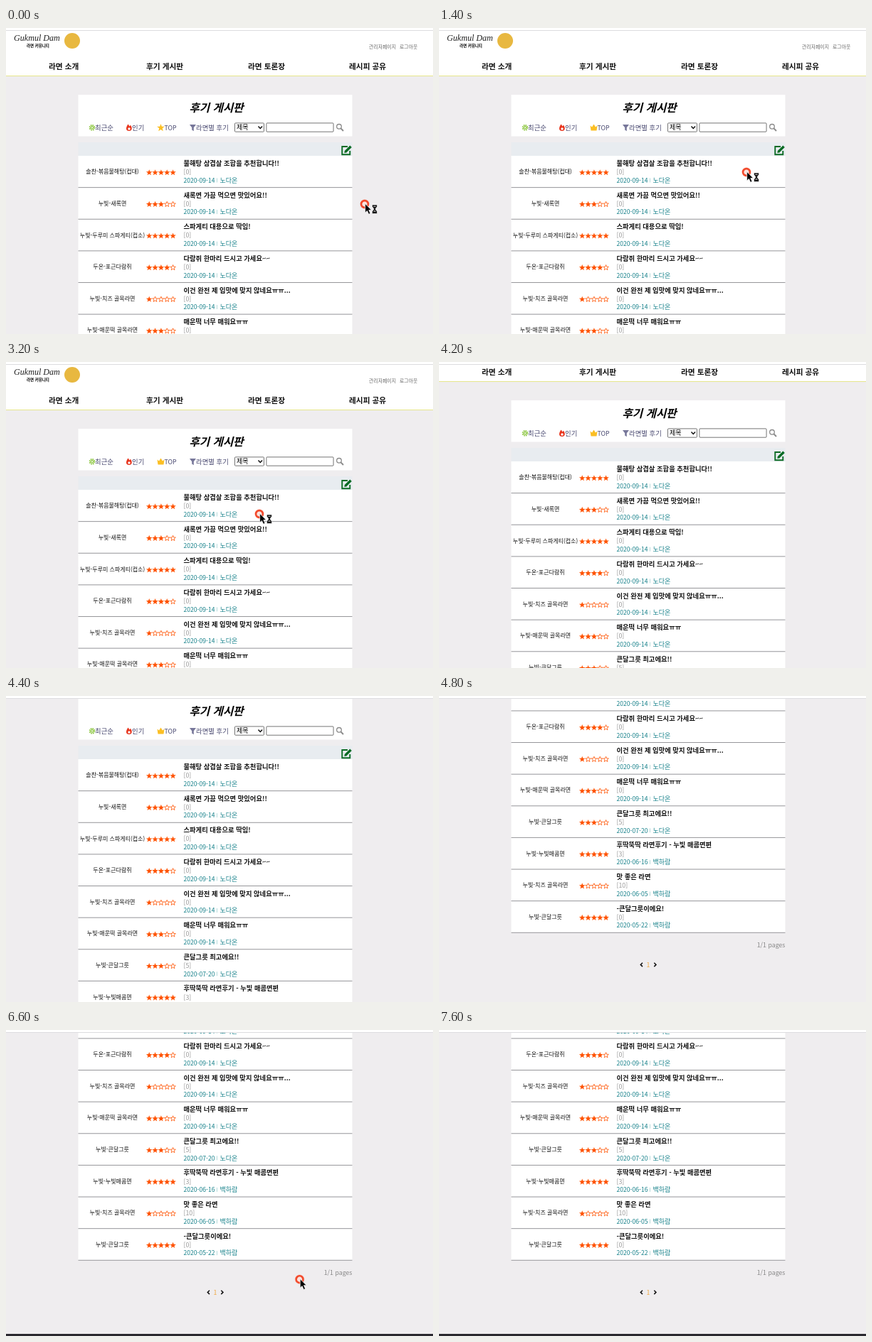
An HTML page that plays this animation: 600 px wide and 431 px high, repeating every 8 s.

```html
<!DOCTYPE html>
<html lang="ko">
<head>
<meta charset="utf-8">
<title>후기 게시판</title>
<style>
  html, body { margin: 0; width: 100%; height: 100%; overflow: hidden; background: #efedef; }
  svg { display: block; width: 600px; height: 431px; }
  text { font-family: "Noto Sans CJK KR", "Noto Sans", sans-serif; white-space: pre; }
  .b { font-weight: 700; }
  .nav { font-size: 10.7px; font-weight: 700; fill: #111; }
  .menu { font-size: 9.4px; fill: #47476f; }
  .subject { font-size: 9.3px; font-weight: 700; fill: #111; }
  .count { font-size: 8.8px; fill: #999; }
  .date { font-size: 8.6px; fill: #16808a; }
  .who { font-size: 9px; fill: #16808a; }
  .item { font-size: 8px; font-weight: 500; fill: #111; text-anchor: middle; }
  .user { font-size: 6.9px; fill: #666; }
</style>
</head>
<body>
<svg viewBox="0 0 600 431">
  <g id="page">
    <rect y="-10" width="600" height="77" fill="#fff"/>
    <rect y="67" width="600" height="1" fill="#e6e68c"/>
    <text x="11" y="18" style="font: italic 12.1px 'Liberation Serif', serif" fill="#222">Gukmul Dam</text>
    <text x="29" y="27.3" class="b" font-size="5.5">라면 커뮤니티</text>
    <circle cx="93" cy="18" r="11" fill="#e8b840"/>
    <text x="510" y="28.6" class="user">관리자페이지</text>
    <text x="553" y="28.6" class="user">로그아웃</text>
    <text x="60" y="58" class="nav">라면 소개</text>
    <text x="197" y="58" class="nav">후기 게시판</text>
    <text x="340" y="58" class="nav">라면 토론장</text>
    <text x="482" y="58" class="nav">레시피 공유</text>

    <rect x="101.5" y="94" width="385" height="58.5" fill="#fff"/>
    <text x="257.5" y="117.5" font-size="15.6" font-weight="900" font-style="italic">후기 게시판</text>
    <g fill="none" stroke="#8cc63f">
      <circle cx="121" cy="140.3" r="3.4" stroke-width="1.8" stroke-dasharray="1.7 .97"/>
      <circle cx="121" cy="140.3" r="1.7" stroke-width="1.2"/>
    </g>
    <path d="M171.500 135.500C173 137 173 138 173.500 138.500C174.500 138 174.500 137 174.500 136.500C177.500 139 178 145 173 145C168 145 168 140 171.500 135.500Z" fill="#e8341c"/>
    <circle cx="173" cy="142" r="1.7" fill="#fff"/>
    <path id="star" fill="#fbbf24"/>
    <path id="crown" d="M212.500 137.500L215 139.500L217.500 135.500L220 139.500L222.500 137.500L221.500 144.500H213.500Z" fill="#fbbf24"/>
    <path d="M258 136H267L263.800 140.300V145.300L261.200 143.500V140.300Z" fill="#77779a"/>
    <text x="125" y="143.700" class="menu">최근순</text>
    <text x="177" y="143.700" class="menu">인기</text>
    <text x="222.500" y="143.700" class="menu" style="font-size:8.800px">TOP</text>
    <text x="267" y="143.700" class="menu">라면별 후기</text>
    <g fill="#fff" stroke="#666" stroke-width=".9">
      <rect x="321.500" y="133.900" width="41" height="12.300" rx="1"/>
      <rect x="365.900" y="133.900" width="94.200" height="12.300" rx="1"/>
    </g>
    <text x="324" y="143.300" font-size="9">제목</text>
    <path d="M354.500 138.500L357.300 141.500L360.100 138.500" fill="none" stroke="#111" stroke-width="1.500"/>
    <g fill="none" stroke="#8a8a8a">
      <circle cx="468" cy="138.800" r="3.300" stroke-width="1.300"/>
      <path d="M470.500 141.300L474 145" stroke-width="1.900"/>
    </g>

    <rect x="101.500" y="161" width="385" height="19" fill="#e8ecf0"/>
    <g fill="none" stroke="#0b6b24">
      <path d="M480 167H472.300V178.300H483.300V173" stroke-width="1.900"/>
      <path d="M476.800 174.500L484.600 166.700" stroke-width="3.400"/>
    </g>
    <path d="M475.300 176L476 172.800L478.500 175.300Z" fill="#0b6b24"/>
    <g id="rows"></g>

    <text x="486.500" y="646.500" font-size="8.800" fill="#888" text-anchor="end">1/1 pages</text>
    <g fill="none" stroke="#111" stroke-width="1.500">
      <path d="M286 668.700L283.300 671.400L286 674.100"/>
      <path d="M302.300 668.700L305 671.400L302.300 674.100"/>
    </g>
    <text x="294" y="674.700" font-size="8.800" fill="#f0a840" text-anchor="middle">1</text>
    <rect y="730" width="600" height="40" fill="#2a292f"/>
  </g>

  <rect width="600" height="3" fill="#fff"/>
  <rect y="3" width="600" height="1" fill="#dcdcdf"/>

  <g id="cursor">
    <circle r="6.700" fill="#ff8a70" opacity=".35"/>
    <circle r="4.900" fill="#fbe3de" stroke="#f24a2c" stroke-width="2.600"/>
    <path d="M.7 -.5V12L3.500 9.400L5.700 14.300L8 13.300L5.800 8.500H9.600Z" fill="#000" stroke="#fff" stroke-width=".7"/>
    <g id="busy">
      <path d="M10.500 1H17.500V3.500L15 7L17.500 10.500V13.500H10.500V10.500L13 7L10.500 3.500Z" fill="#111" stroke="#fff" stroke-width=".6"/>
      <path d="M12.300 3.300H15.700M12.600 11.200L14 9.300L15.400 11.200" fill="none" stroke="#fff" stroke-width=".8"/>
    </g>
  </g>
</svg>
<script>
const $ = id => document.getElementById(id);
const LOOP = 8000, STEP = 200, TOP = 180, ROW = 44.63;

// item, stars, subject, comments, date, writer
const A = "노다온", B = "백하람", SEP = "2020-09-14";
const posts = [
  ["솔찬-볶음불해탕(컵대)", 5, "불해탕 삼겹살 조합을 추천합니다!!", 0, SEP, A],
  ["누빛-새록면", 3, "새록면 가끔 먹으면 맛있어요!!", 0, SEP, A],
  ["누빛-두루미 스파게티(컵소)", 5, "스파게티 대용으로 딱임!", 0, SEP, A],
  ["두온-포근다람쥐", 4, "다람쥐 한마리 드시고 가세요~~", 0, SEP, A],
  ["누빛-치즈 골목라면", 1, "이건 완전 제 입맛에 맞지 않네요ㅠㅠ...", 0, SEP, A],
  ["누빛-매운떡 골목라면", 3, "매운떡 너무 매워요ㅠㅠ", 0, SEP, A],
  ["누빛-큰달그릇", 3, "큰달그릇 최고에요!!", 5, "2020-07-20", A],
  ["누빛-누빛매콤면", 5, "후딱뚝딱 라면후기 - 누빛 매콤면편", 3, "2020-06-16", B],
  ["누빛-치즈 골목라면", 1, "맛 좋은 라면", 10, "2020-06-05", B],
  ["누빛-큰달그릇", 5, "-큰달그릇이에요!", 0, "2020-05-22", B]
];

function starPath(cx, cy, r) {
  let d = "";
  for (let i = 0; i < 10; i++) {
    const a = i * Math.PI / 5, q = i % 2 ? r * 0.42 : r;
    d += (i ? "L" : "M") + (cx + q * Math.sin(a)).toFixed(2) + " " + (cy - q * Math.cos(a)).toFixed(2);
  }
  return d + "Z";
}

const label = (x, y, cls, s) => `<text x="${x}" y="${y}" class="${cls}">${s}</text>`;

function row([item, score, subject, count, date, who], i) {
  const y = TOP + i * ROW;
  let s = `<rect x="101.5" y="${y}" width="385" height="${ROW}" fill="#fff"/>`;
  s += `<rect x="101.5" y="${y + ROW - 0.5}" width="385" height="1" fill="#96969a"/>`;
  s += label(149.5, y + 25.3, "item", item);
  for (let k = 0; k < 5; k++) {
    const on = k < score;
    s += `<path d="${starPath(201.2 + k * 8.35, y + 23.7, on ? 4.5 : 4)}" fill="${on ? "#ff5200" : "none"}" stroke="#ff5200" stroke-width="${on ? 0 : 0.8}"/>`;
  }
  s += label(249.5, y + 14, "subject", subject);
  s += label(249.5, y + 26.2, "count", `[${count}]`);
  s += label(249.5, y + 37.8, "date", date);
  s += `<rect x="296.3" y="${y + 31.5}" width=".7" height="6" fill="#9cc"/>`;
  return s + label(300.5, y + 37.8, "who", who);
}

$("rows").innerHTML = posts.map(row).reverse().join("");
$("star").setAttribute("d", starPath(217.5, 140.6, 5.6));

// Keys are [time, ...values], joined by straight lines
const scroll = [[3600, 0], [4000, 10], [4200, 40], [4400, 91], [4800, 293], [5000, 302]];
const first = [[0, 504, 248], [1200, 466, 217], [1400, 432, 203], [3200, 356, 214], [3600, 496, 240]];
const second = [[5400, 284, 398], [5800, 292, 384], [6400, 396, 361], [7400, 479, 312]];

function at(keys, t) {
  const n = keys.findIndex(k => k[0] > t);
  if (n === 0) return keys[0].slice(1);
  if (n < 0) return keys[keys.length - 1].slice(1);
  const a = keys[n - 1], b = keys[n], p = (t - a[0]) / (b[0] - a[0]);
  return a.slice(1).map((v, i) => v + (b[i + 1] - v) * p);
}

const show = (id, on) => $(id).setAttribute("visibility", on ? "inherit" : "hidden");

function draw(now) {
  const t = Math.floor(now % LOOP / STEP) * STEP;
  $("page").setAttribute("transform", `translate(0 ${-at(scroll, t)[0]})`);
  show("star", t < 200);
  show("crown", t >= 200);
  const early = t < 3800;
  show("cursor", early || (t >= 5400 && t < 7600));
  show("busy", early);
  $("cursor").setAttribute("transform", `translate(${at(early ? first : second, t).join(" ")})`);
}

const start = performance.now();
function tick() {
  draw(performance.now() - start);
  requestAnimationFrame(tick);
}
tick();
</script>
</body>
</html>
```
